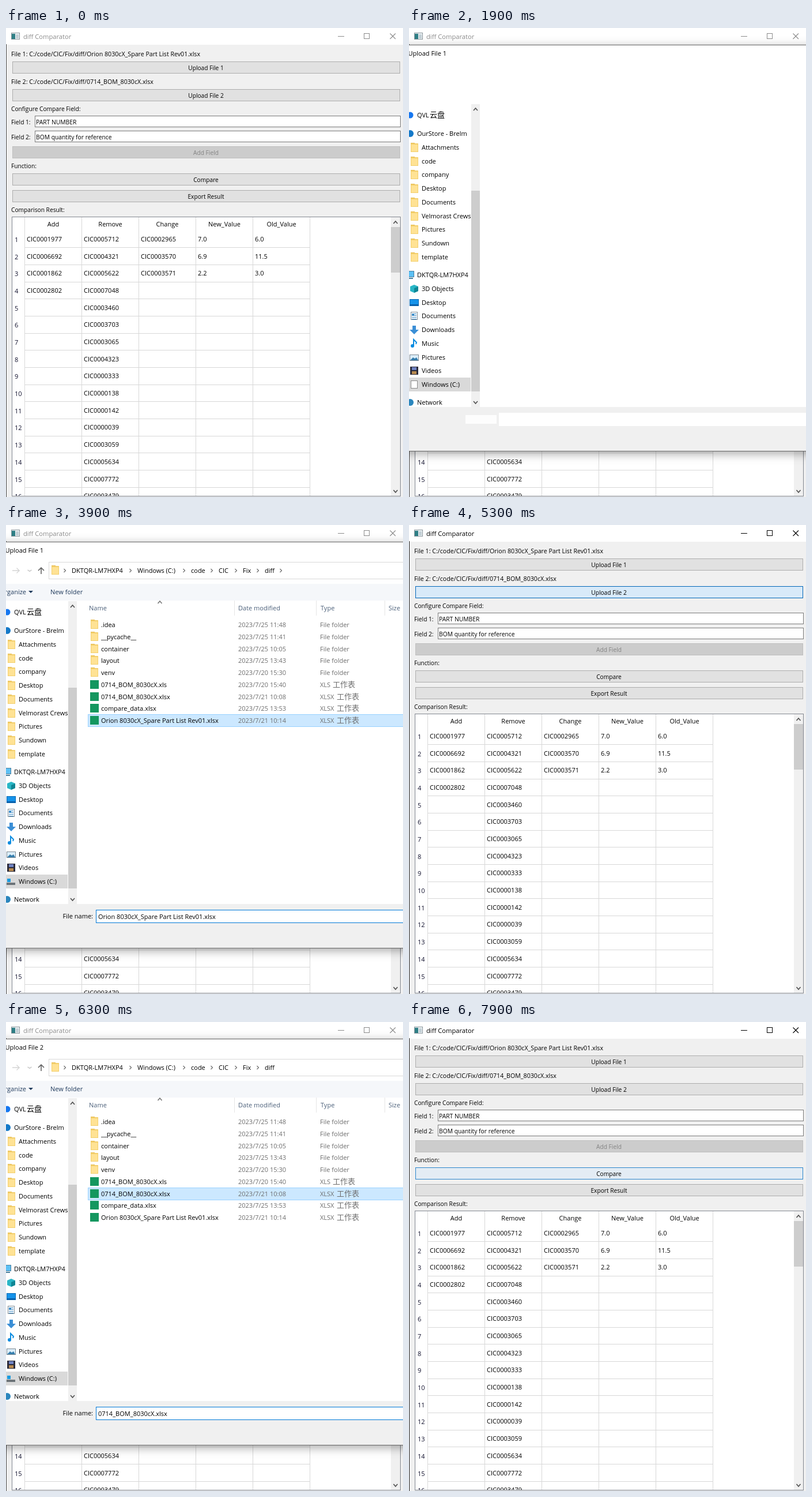
An HTML page with a canvas that plays this animation: 689 by 813 pixels, repeating every 8 s.

```html
<!DOCTYPE html>
<html lang="en">
<head>
<meta charset="utf-8">
<title>diff Comparator</title>
<style>
  html, body { margin: 0; width: 100%; height: 100%; overflow: hidden; background: #f0f0f0; }
  canvas { display: block; }
</style>
</head>
<body>
<canvas id="stage" width="689" height="813"></canvas>
<script>
const LOOP = 8000, STEP = 100, MARGIN = 20;
const FONT = '"Open Sans", "Noto Sans CJK SC", "Noto Sans CJK", sans-serif';
const stage = document.getElementById('stage').getContext('2d');
const dialogLayer = document.createElement('canvas');
dialogLayer.width = 1150;
dialogLayer.height = 813;
const dialog = dialogLayer.getContext('2d');
let g = stage;

const visits = [
  { title: 'Upload File 1', open: 1700, scan: 2400, pick: 3300, row: 8, drift: Infinity, close: 3900, fade: 133, crumbEnd: 2400 },
  { title: 'Upload File 2', open: 5500, scan: 5900, pick: 6200, row: 6, drift: 6500, close: 6600, fade: 400, crumbEnd: Infinity }
];
const columns = ['Add', 'Remove', 'Change', 'New_Value', 'Old_Value'];
const part = n => 'CIC' + String(n).padStart(7, '0');
const cells = [
  [1977, 6692, 1862, 2802].map(part),
  [5712, 4321, 5622, 7048, 3460, 3703, 3065, 4323, 333, 138, 142, 39, 3059, 5634, 7772, 3479].map(part),
  [2965, 3570, 3571].map(part),
  ['7.0', '6.9', '2.2'],
  ['6.0', '11.5', '3.0']
];
const files = [
  ['.idea', '25 11:48'], ['__pycache__', '25 11:41'], ['container', '25 10:05'],
  ['layout', '25 13:43'], ['venv', '20 15:30'], ['0714_BOM_8030cX.xls', '20 15:40'],
  ['0714_BOM_8030cX.xlsx', '21 10:08'], ['compare_data.xlsx', '25 13:53'],
  ['Orion 8030cX_Spare Part List Rev01.xlsx', '21 10:14']
];
const folders = ['Attachments', 'code', 'company', 'Desktop', 'Documents', 'Velmorast Crews', 'Pictures', 'Sundown', 'template'];
const places = ['3D Objects', 'Desktop', 'Documents', 'Downloads', 'Music', 'Pictures', 'Videos', 'Windows (C:)'];
const crumbs = [['DKTQR-LM7HXP4', 114], ['Windows (C:)', 228], ['code', 321], ['CIC', 369], ['Fix', 411], ['diff', 449]];

const clamp = v => Math.max(0, Math.min(1, v));
const ramp = (t, from, to) => clamp((t - from + STEP) / (to - from + STEP));

function rect(x, y, w, h, color) {
  g.fillStyle = color;
  g.fillRect(x, y, w, h);
}
function box(x, y, w, h, fill, border) {
  rect(x + 1, y + 1, w - 2, h - 2, fill);
  g.strokeStyle = border;
  g.lineWidth = 1;
  g.strokeRect(x + 0.5, y + 0.5, w - 1, h - 1);
}
function text(s, x, y, color = '#000', size = 11, align = 'left') {
  g.font = `${size}px ${FONT}`;
  g.textAlign = align;
  g.fillStyle = color;
  g.fillText(s, x, y + 4);
}
function stroke(color, width, ...points) {
  g.strokeStyle = color;
  g.lineWidth = width;
  g.beginPath();
  points.forEach(([x, y], i) => i ? g.lineTo(x, y) : g.moveTo(x, y));
  g.stroke();
}
function shape(color, ...points) {
  g.fillStyle = color;
  g.beginPath();
  points.forEach(([x, y]) => g.lineTo(x, y));
  g.fill();
}
function disc(x, y, r, color) {
  g.fillStyle = color;
  g.beginPath();
  g.arc(x, y, r, 0, 7);
  g.fill();
}
const vee = (x, y, d, color = '#505050') => stroke(color, 1.6, [x - 3.5, y + 2 * d], [x, y - 2 * d], [x + 3.5, y + 2 * d]);
const chevron = (x, y) => stroke('#666', 1.1, [x - 1.5, y - 3], [x + 1.5, y], [x - 1.5, y + 3]);

function scrollbar(x, top, bottom, width, thumbTop, thumbBottom) {
  rect(x, top, width, bottom - top, '#f0f0f0');
  rect(x, thumbTop, width, thumbBottom - thumbTop, '#cdcdcd');
  vee(x + width / 2, top + 9, 1);
  vee(x + width / 2, bottom - 8, -1);
}

// ---- main window ----
function button(y, label, hover = 0, press = 0) {
  box(11, y, 673, 21, '#e1e1e1', '#adadad');
  g.globalAlpha = hover;
  box(11, y, 673, 21, '#e5f1fb', '#0078d7');
  g.globalAlpha = press;
  box(11, y, 673, 21, '#cce4f7', '#005499');
  g.globalAlpha = 1;
  text(label, 347, y + 11, '#000', 10.2, 'center');
}
function input(y, label, value, border) {
  text(label, 9, y + 11, '#000', 10.2);
  box(50, y, 635, 20, '#fff', border);
  text(value, 52, y + 11, '#000', 10.3);
}
function titleBar(active) {
  const ink = active ? '#000' : '#8c8c8c';
  rect(0, 0, 689, 29, '#fff');
  box(9, 8, 15, 12, '#eef3f5', '#8a969c');
  rect(10, 10, 6, 9, '#2f7f86');
  rect(17, 11, 5, 7, '#c3d0d6');
  text('diff Comparator', 30, 15, ink, 11.2);
  stroke(ink, 1, [576, 14.5], [587, 14.5]);
  g.strokeRect(621.5, 9.5, 9, 9);
  stroke(ink, 1.1, [666.5, 9.5], [676, 19]);
  stroke(ink, 1.1, [676, 9.5], [666.5, 19]);
}
function table() {
  box(10, 327, 675, 485, '#fff', '#828790');
  g.save();
  g.beginPath();
  g.rect(11, 328, 673, 483);
  g.clip();
  for (let c = 0; c <= 5; c++) rect(32 + 99 * c, 328, 1, 483, '#d8d8d8');
  for (let r = 0; r < 16; r++) {
    const y = 366 + r * 29.68;
    rect(32, Math.round(y + 14.3), 496, 1, '#d8d8d8');
    text(r + 1, 15, Math.round(y) + 1, '#10102c');
    cells.forEach((column, c) => text(column[r] ?? '', 36 + 99 * c, Math.round(y)));
  }
  columns.forEach((name, c) => text(name, 82 + 99 * c, 340, '#000', 11, 'center'));
  g.restore();
  scrollbar(668, 328, 811, 16, 345, 424);
}
function mainWindow(t) {
  const active = t >= 1400 && t < 1500 || t >= 4100 && t < 5400 || t >= 7000;
  const first = t < 1900, second = t < 5700;
  rect(0, 0, 689, 813, '#f0f0f0');
  titleBar(active);
  rect(0, 28, 1, 785, active ? '#222' : '#4a4a4a');
  text('File 1: C:/code/CIC/Fix/diff/Orion 8030cX_Spare Part List Rev01.xlsx', 9, 45, '#000', 10.65);
  button(58, 'Upload File 1', first * ramp(t, 200, 500), first * ramp(t, 700, 1100) / 2);
  text('File 2: C:/code/CIC/Fix/diff/0714_BOM_8030cX.xlsx', 9, 93, '#000', 10.65);
  button(106, 'Upload File 2', second * ramp(t, 4600, 4800), second && t >= 5300 ? 0.5 : 0);
  text('Configure Compare Field:', 9, 140, '#000', 10.2);
  input(152, 'Field 1:', 'PART NUMBER', '#7a7a7a');
  input(178, 'Field 2:', 'BOM quantity for reference', t >= 4100 && t < 4300 ? '#171717' : '#7a7a7a');
  box(11, 205, 673, 21, '#ccc', '#bfbfbf');
  text('Add Field', 347, 216, '#838383', 10.2, 'center');
  text('Function:', 9, 239, '#000', 10.2);
  button(252, 'Compare', 0.75 * ramp(t, 7500, 7900));
  button(281, 'Export Result', t >= 7400 ? 0.6 * (1 - ramp(t, 7500, 7600)) : 0);
  text('Comparison Result:', 9, 315, '#000', 10.2);
  table();
}

// ---- file dialog ----
function folder(x, y) {
  rect(x, y - 8, 7, 4, '#e8bd52');
  rect(x, y - 7, 13, 15, '#f3cf6c');
  rect(x + 1, y - 5, 11, 12, '#ffe294');
}
const placeIcons = [
  y => { shape('#29b6c6', [2, y - 4], [9, y - 7], [16, y - 4], [16, y + 4], [9, y + 7], [2, y + 4]); shape('#0f8594', [9, y - 1], [16, y - 4], [16, y + 4], [9, y + 7]); },
  y => { box(1, y - 6, 16, 12, '#1593ea', '#0667b3'); rect(2, y + 3, 14, 2, '#0a5ea8'); },
  y => { box(3, y - 7, 12, 14, '#fff', '#7d8a94'); for (let i = 0; i < 4; i++) rect(5, y - 4 + 3 * i, 8, 1, '#3c8cc8'); rect(5, y - 4, 4, 4, '#3c8cc8'); },
  y => shape('#3b8fd6', [6, y - 7], [12, y - 7], [12, y], [17, y], [9, y + 8], [1, y], [6, y]),
  y => { stroke('#0c8ce0', 2, [8, y + 4], [8, y - 7], [13, y - 2], [12, y + 1]); disc(6, y + 4, 3, '#0c8ce0'); },
  y => { box(1, y - 5, 16, 11, '#dceefa', '#7d8a94'); shape('#377fae', [2, y + 5], [7, y], [10, y + 2], [13, y], [16, y + 5]); },
  y => { rect(2, y - 7, 14, 14, '#2b2b3a'); rect(5, y - 6, 8, 5, '#6f83c2'); rect(5, y + 1, 8, 5, '#b98b50'); },
  (y, loaded) => {
    if (!loaded) return box(3, y - 7, 12, 14, '#fff', '#8a8a8a');
    rect(2, y - 5, 6, 6, '#1a9be0');
    rect(1, y + 2, 15, 4, '#6c7378');
  }
];
function sidebar(loaded) {
  g.save();
  g.beginPath();
  g.rect(-MARGIN, 131, MARGIN + 107, 526);
  g.clip();
  disc(2, 151, 5.5, '#1677f0');
  text('QVL', 14, 151);
  text('云盘', 36, 151, '#000', 13);
  disc(2, 183, 6, '#1479c9');
  text('OurStore - Brelm', 14, 183);
  folders.forEach((name, i) => {
    const y = Math.round(207 + 23.7 * i);
    folder(3, y);
    text(name, 22, y);
  });
  box(-6, 421, 15, 11, '#5cc0f5', '#4a7e9c');
  rect(-2, 433, 9, 2, '#4a7e9c');
  text('DKTQR-LM7HXP4', 14, 428);
  rect(-17, 606, 124, 24, '#d9d9d9');
  places.forEach((name, i) => {
    const y = Math.round(452 + 23.7 * i);
    placeIcons[i](y, loaded);
    text(name, 22, y);
  });
  disc(2, 649, 6, '#2b86bd');
  text('Network', 14, 649);
  g.restore();
  scrollbar(108, 132, 657, 15, 282, 630);
}
function addressBar(showEnd) {
  stroke('#d4d4d4', 1.3, [11, 79], [23, 79], [18.5, 74.5]);
  stroke('#d4d4d4', 1.3, [23, 79], [18.5, 83.5]);
  vee(41, 79, -0.6, '#ccc');
  stroke('#5a5a5a', 1.5, [61, 85], [61, 74]);
  stroke('#5a5a5a', 1.5, [56, 79], [61, 74], [66, 79]);
  box(74, 64, 850, 30, '#fff', '#d9d9d9');
  folder(79, 78);
  crumbs.forEach(([name, x]) => {
    chevron(x - 12, 79);
    text(name, x, 79);
  });
  if (showEnd) chevron(477, 79);
  rect(-17, 102, 1124, 29, '#f5f7fa');
  text('Organize', 35, 116, '#1e395b', 11, 'right');
  shape('#1e395b', [39, 114], [47, 114], [43, 118]);
  text('New folder', 77, 116, '#1e395b');
}
function fileList(visit, t) {
  vee(267, 134, 1, '#777');
  [['Name', 144], ['Date modified', 403], ['Type', 546], ['Size', 664]].forEach(([name, x]) => text(name, x, 144, '#4c607a'));
  for (const x of [396, 538, 657]) rect(x, 131, 1, 26, '#e5e5e5');

  const picked = t >= visit.pick;
  let hovered = -1;
  if (t >= visit.drift) hovered = visit.row + 1;
  else if (!picked && t >= visit.scan) hovered = Math.floor((t - visit.scan) / (visit.pick - visit.scan) * (visit.row + 1));

  files.forEach(([name, date], i) => {
    const y = Math.round(173 + 20.75 * i), sheet = name.includes('.xls'), type = name.endsWith('x') ? 'XLSX' : 'XLS';
    if (picked && i === visit.row) box(142, y - 11, 900, 22, '#cce8ff', '#99d1ff');
    else if (i === hovered) rect(142, y - 11, 900, 22, '#e5f3ff');
    if (sheet) rect(146, y - 8, 15, 15, '#14975f');
    else folder(147, y - 1);
    text(name, 165, y);
    text('2023/7/' + date, 403, y, '#6d6d6d');
    text(sheet ? type : 'File folder', 545, y, '#6d6d6d');
    if (sheet) text('工作表', type === 'XLSX' ? 574 : 567, y, '#6d6d6d', 13);
  });
}
function fileDialog(visit, t) {
  const loaded = t >= visit.open + 300, picked = t >= visit.pick;
  g = dialog;
  g.setTransform(1, 0, 0, 1, 0, 0);
  g.clearRect(0, 0, 1150, 813);
  g.translate(MARGIN, 0);
  g.save();
  g.shadowColor = 'rgba(0,0,0,.35)';
  g.shadowBlur = 16;
  g.shadowOffsetY = 4;
  rect(-18, 29, 1126, 705, '#666');
  g.restore();
  rect(-17, 30, 1124, 703, '#fff');
  text(visit.title, -1.5, 44);
  if (loaded) {
    addressBar(t >= visit.crumbEnd);
    fileList(visit, t);
  }
  sidebar(loaded);
  rect(-17, 657, 1124, 76, '#f0f0f0');
  if (loaded) {
    text('File name:', 151, 678, '#000', 11, 'right');
    box(156, 667, 700, 23, '#fff', '#0078d7');
    if (picked) text(files[visit.row][0], 160, 679);
    else if (Math.floor((t - visit.open - 300) / 500) % 2 === 0) rect(160, 671, 1, 15, '#000');
  } else {
    rect(98, 671, 54, 15, '#fdfdfd');
    rect(156, 667, 700, 23, '#fff');
  }
  g = stage;
}

function draw(t) {
  mainWindow(t);
  for (const visit of visits) {
    const shown = ramp(t, visit.open, visit.open + 200) * clamp(1 - (t - visit.close) / visit.fade);
    if (t < visit.open || shown <= 0) continue;
    fileDialog(visit, t);
    const scale = 0.953 + 0.047 * shown;
    stage.save();
    stage.globalAlpha = shown;
    stage.translate(545, 361);
    stage.scale(scale, scale);
    stage.drawImage(dialogLayer, -545 - MARGIN, -361);
    stage.restore();
  }
}

const start = performance.now();
function tick() {
  const t = (performance.now() - start) % LOOP;
  draw(Math.floor(t / STEP) * STEP);
  requestAnimationFrame(tick);
}
tick();
</script>
</body>
</html>
```
